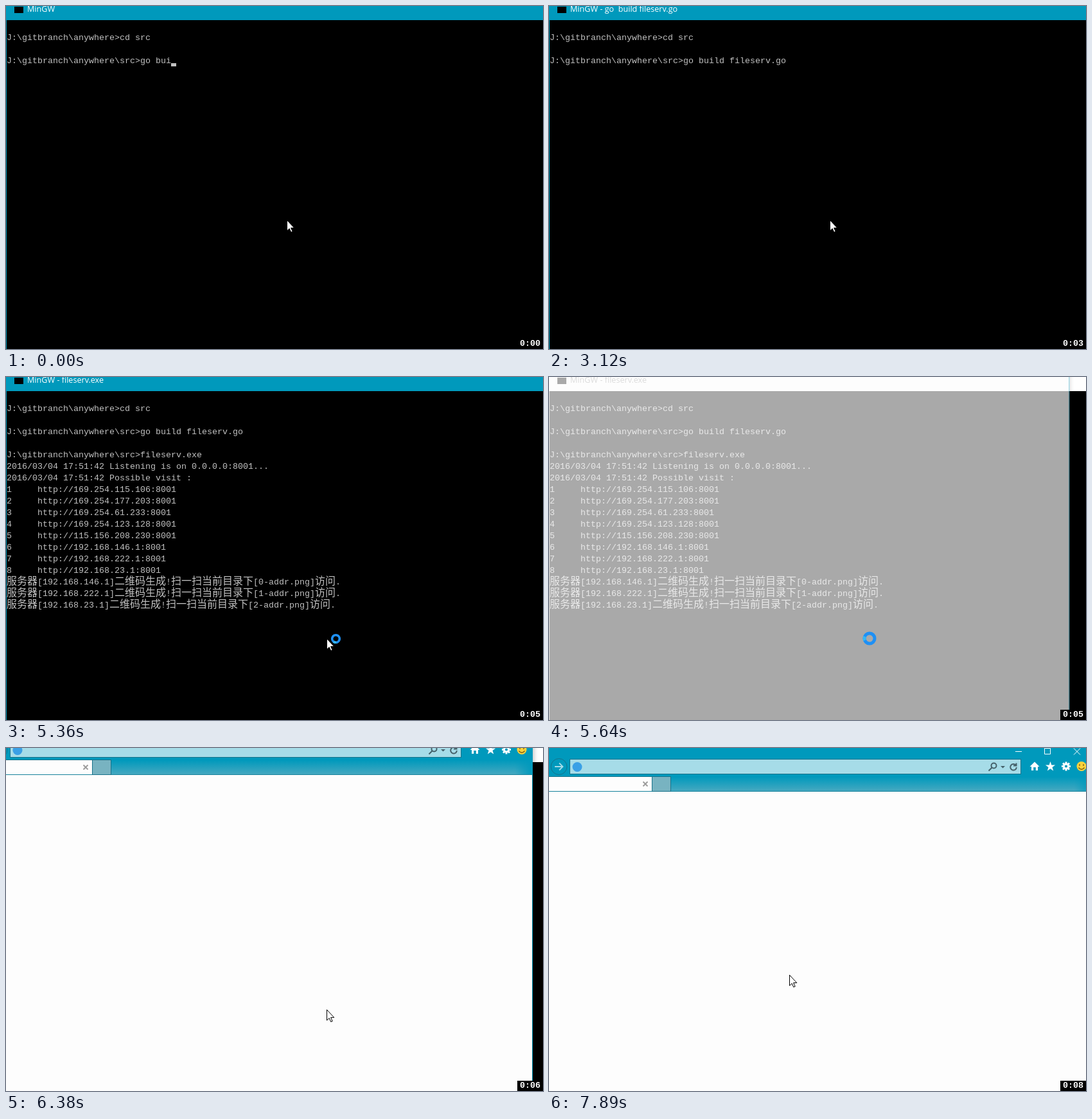
These frames come from a looping animation (836 px wide and 534 px high, 8 s). An HTML page:

```html
<!DOCTYPE html>
<html lang="en">
<head>
<meta charset="utf-8">
<title>Terminal session</title>
<style>
html, body { margin: 0; width: 100%; height: 100%; overflow: hidden; background: #000; }
#stage { position: relative; width: 836px; height: 534px; overflow: hidden; background: #000; }
#stage div, #stage svg { position: absolute; }
#term { inset: 0; border-left: 1px solid #0099bc; }
#bar { left: -1px; top: 0; width: 836px; height: 22px; background: #0099bc; }
#icon { left: 12px; top: 1px; width: 14px; height: 10px; background: #000; }
#title { left: 32px; top: -4px; color: #fff; font: 12.6px/18px "Open Sans", sans-serif; white-space: pre; }
#term.idle { border-color: #aaa; }
#term.idle #bar { background: #fff; }
#term.idle #title { color: #999; }
#text { left: 0; top: 41px; color: #c0c0c0; font: 13.333px/18px "Liberation Mono", monospace; white-space: pre; }
#text b { font: 16px/0 "Noto Sans CJK SC", "Noto Sans CJK JP", "Noto Sans CJK", sans-serif; }
#caret { width: 8px; height: 5px; background: #c0c0c0; }
#clock { left: 796px; top: 518px; width: 40px; height: 16px; background: #000; color: #fff;
  font: bold 13.333px/16px "Liberation Mono", monospace; text-align: center; }

.win { left: -100px; top: -40px; width: 946px; height: 634px; transform-origin: 513px 272px;
  box-shadow: 0 0 9px rgba(0, 0, 0, .35);
  --bar: #0099bc; --field: #a6dce8; --line: #17728a; --ico: #fff; --edge: none; --plus: #78b3c1;
  --base: #17829c; --side: #0099bc; --glow: 1; }
.win.idle { --bar: #fff; --field: #fff; --line: #c4c4c4; --ico: #fff; --edge: #888; --plus: #ededed;
  --base: #fdfdfd; --side: #aaa; --glow: 0; }
.win text { font: 12.6px "Open Sans", sans-serif; fill: #111; }
.win text.tab { font-size: 12px; }
.cap { fill: var(--bar); }
.tools { fill: var(--ico); stroke: var(--edge); }
.lined { stroke: var(--line); }
.glow { opacity: var(--glow); }
.stroke { fill: none; stroke: #45616a; stroke-width: 2; }
</style>
</head>
<body>
<div id="stage">
  <svg width="0" height="0">
    <linearGradient id="fade" x2="0" y2="1">
      <stop stop-color="#0099bc"/><stop offset="1" stop-color="#45a8c0"/>
    </linearGradient>
    <linearGradient id="end">
      <stop stop-color="#0099bc" stop-opacity="0"/><stop offset="1" stop-color="#0099bc"/>
    </linearGradient>
  </svg>
  <div id="term">
    <div id="bar"></div><div id="icon"></div><div id="title"></div>
    <div id="text"></div><div id="caret"></div>
  </div>
  <svg class="win" id="win1"></svg>
  <svg class="win" id="win2"></svg>
  <svg id="mouse" width="60" height="60" viewBox="-20 -20 60 60">
    <path id="arrow" d="M.5.5V17L4.2 13.5 6.8 19.3 9.2 18.2 6.6 12.6H11.8Z" fill="#fff" stroke="#000"/>
    <g id="ring" fill="none">
      <circle r="8" stroke="#1e90f5" stroke-width="5"/>
      <path d="M-7.4 3A8 8 0 0 1-7.4 -3" stroke="#35b8f5" stroke-width="5"/>
    </g>
  </svg>
  <div id="clock"></div>
</div>
<script>
const LOOP = 8000;
const SPIN = 1370;
const $ = id => document.getElementById(id);
const show = (el, on) => { el.style.display = on ? '' : 'none'; };

const root = 'J:\\gitbranch\\anywhere';
const prompt = root + '\\src>';
const stamp = '2016/03/04 17:51:42 ';
const hosts = ['169.254.115.106', '169.254.177.203', '169.254.61.233', '169.254.123.128',
  '115.156.208.230', '192.168.146.1', '192.168.222.1', '192.168.23.1'];
const log = [
  stamp + 'Listening is on 0.0.0.0:8001...',
  stamp + 'Possible visit :',
  ...hosts.map((ip, i) => `${i + 1}     http://${ip}:8001`),
  ...hosts.slice(5).map((ip, i) => `服务器[${ip}]二维码生成!扫一扫当前目录下[${i}-addr.png]访问.`)
];

// Each step changes part of the state from its time on.
const steps = [
  [0, { build: 'go bui', run: null, lines: 0, caret: 1, title: '', mouse: [437, 333], busy: 0, idle: 0, win1: 0, win2: 0 }],
  [280, { build: 'go buil' }],
  [420, { build: 'go build' }],
  [560, { caret: 0 }],
  [830, { caret: 1 }],
  [970, { build: 'go build ' }],
  [1100, { caret: 0 }],
  [1540, { build: 'go build fi' }],
  [1820, { caret: 1 }],
  [1975, { build: 'go build fileserv.go' }],
  [2130, { caret: 0 }],
  [2590, { caret: 1 }],
  [2840, { title: ' - go  build fileserv.go', wait: 1 }],
  [3120, { caret: 0 }],
  [3390, { caret: 1 }],
  [3650, { caret: 0 }],
  [3780, { caret: 1 }],
  [4240, { title: '', run: '' }],
  [4370, { run: 'fi' }],
  [4500, { run: 'fileserv.exe' }],
  [4780, { title: ' - fileserv.exe', caret: 0, mouse: [456, 356] }],
  [4915, { lines: 10, mouse: [482, 388], busy: 1 }],
  [5050, { lines: 13, mouse: [499, 407] }],
  [5640, { busy: 2, idle: 1, win1: 1, fade: .67 }],
  [5790, { win1: 2 }],
  [5940, { win1: 3 }],
  [6070, { busy: 0 }],
  [6530, { win1: 4 }],
  [6880, { busy: 2 }],
  [7010, { win2: 1, fade: .6 }],
  [7160, { win2: 2 }],
  [7290, { win2: 3, busy: 0 }],
  [7550, { mouse: [480, 404] }],
  [7660, { mouse: [425, 392] }],
  [7780, { mouse: [386, 372] }],
  [7890, { mouse: [374, 353] }]
];

const gear = Array.from({ length: 8 }, (_, i) =>
  `<rect x="-1.5" y="-7" width="3" height="4" stroke="none" transform="rotate(${i * 45})"/>`).join('');
const star = Array.from({ length: 10 }, (_, i) => {
  const r = i % 2 ? 3.2 : 8, a = i * Math.PI / 5;
  return `${(r * Math.sin(a)).toFixed(1)},${(-r * Math.cos(a)).toFixed(1)}`;
}).join(' ');

const browser = `
  <rect x="-100" y="-40" width="946" height="634" fill="#fdfdfd"/>
  <rect class="cap" x="-100" y="-40" width="946" height="50.5"/>
  <g class="chrome">
    <rect class="cap" x="-100" y="-40" width="946" height="107"/>
    <g class="glow">
      <rect x="-100" y="45" width="946" height="22" fill="url(#fade)"/>
      <rect x="818" y="45" width="28" height="22" fill="url(#end)"/>
    </g>
    <path d="M-100 67.5H846" style="stroke:var(--base)"/>
    <circle class="lined" cx="15.5" cy="29" r="12.5" fill="none"/>
    <path d="M9 29H21M16 23.5 21.5 29 16 34.5" fill="none" stroke="#a6dce8" stroke-width="1.8"/>
    <rect class="lined" x="32.5" y="17.5" width="702" height="23" style="fill:var(--field)"/>
    <circle class="logo" cx="44" cy="29.5" r="7.5" fill="#3aa0e6"/>
    <g class="loaded">
      <rect x="38.5" y="23.5" width="11" height="12" fill="#fff" stroke="#2370a8"/>
      <rect x="41" y="27" width="6" height="6" fill="#2f86c9"/>
      <text x="56" y="34">${root}\\src\\1-addr.png</text>
    </g>
    <g class="stroke">
      <circle cx="692.5" cy="27.5" r="4"/><path d="M689.5 30.5 684.5 35.5"/>
      <path d="M726.5 26.5A4.8 4.8 0 1 0 727.8 30M727.5 23.5V27.5H723"/>
    </g>
    <path d="M703 28H710L706.5 31.5Z" fill="#45616a"/>
    <g class="tools">
      <path d="M748.5 29 756 21.5 763.5 29H761V35H757.8V30H754.2V35H751V29Z"/>
      <polygon points="${star}" transform="translate(780.5 29)"/>
      <g transform="translate(805 28.5)">${gear}<circle r="3.6" style="stroke:var(--ico)" fill="none" stroke-width="3"/></g>
    </g>
    <circle cx="829" cy="28.5" r="7.5" fill="#f9d23c"/>
    <path d="M826 25V28M832 25V28M824.5 30.5Q829 36 833.5 30.5" fill="none" stroke="#7a5a12" stroke-width="1.3"/>
    <rect x="-100" y="45" width="260" height="22" fill="#fdfdfd"/>
    <path class="lined" d="M-100 44.5H160.5V67" fill="none"/>
    <path d="M146.5 52.5 153.5 59.5M153.5 52.5 146.5 59.5" stroke="#9a9a9a" stroke-width="1.8"/>
    <rect class="lined" x="160.5" y="44.5" width="29" height="23" style="fill:var(--plus)"/>
    <text class="loaded tab" x="140" y="61" text-anchor="end">J:\\gitbranch\\anywhere\\sr...</text>
  </g>
  <path d="M845.5 -40V594" style="stroke:var(--side)"/>
  <path d="M726 5.5H736M771.5.5H780.5V9.5H771.5ZM817 .5 827 10.5M827 .5 817 10.5" fill="none" stroke="#fff"/>`;

for (const [id, shift] of [['win1', -26], ['win2', 0]]) {
  const win = $(id);
  win.setAttribute('viewBox', '-100 -40 946 634');
  win.innerHTML = browser;
  win.style.translate = `${shift}px ${shift}px`;
}

// Stages: 0 closed, 1 opening, 2 blank, 3 toolbar, 4 page loaded.
function drawWindow(win, stage, fade, idle) {
  show(win, stage);
  win.style.opacity = stage === 1 ? fade : 1;
  win.style.scale = stage === 1 ? .978 : 1;
  win.classList.toggle('idle', idle);
  show(win.querySelector('.chrome'), stage > 2);
  show(win.querySelector('.logo'), stage < 4);
  win.querySelectorAll('.loaded').forEach(el => show(el, stage > 3));
}

function draw(s) {
  const rows = [root + '>cd src', '', prompt + s.build];
  if (s.wait) rows.push('');
  if (s.run !== null) rows.push(prompt + s.run, ...log.slice(0, s.lines));
  $('text').innerHTML = rows.join('\n').replace(/[\u4e00-\u9fff]+/g, '<b>$&</b>');
  $('title').textContent = 'MinGW' + s.title;
  $('term').classList.toggle('idle', s.idle);

  const last = rows.length - 1;
  $('caret').style.left = rows[last].length * 8 + 'px';
  $('caret').style.top = 53 + last * 18 + 'px';
  show($('caret'), s.caret);

  drawWindow($('win1'), s.win1, s.fade, s.win2 > 0);
  drawWindow($('win2'), s.win2, s.fade, false);

  $('mouse').style.left = s.mouse[0] - 20 + 'px';
  $('mouse').style.top = s.mouse[1] - 20 + 'px';
  show($('arrow'), s.busy < 2);
  show($('ring'), s.busy);
}

let shown = -1;
function tick() {
  const t = performance.now() % LOOP;
  const past = steps.filter(([at]) => at <= t);
  const state = Object.assign({}, ...past.map(step => step[1]));
  if (past.length !== shown) {
    draw(state);
    shown = past.length;
  }
  const place = state.busy === 1 ? 'translate(14.5 .5) scale(.72)' : '';
  $('ring').setAttribute('transform', `${place} rotate(${(t - 5640) / SPIN * 360})`);
  $('clock').textContent = '0:0' + Math.floor((t + 220) / 1000);
  requestAnimationFrame(tick);
}
tick();
</script>
</body>
</html>
```
